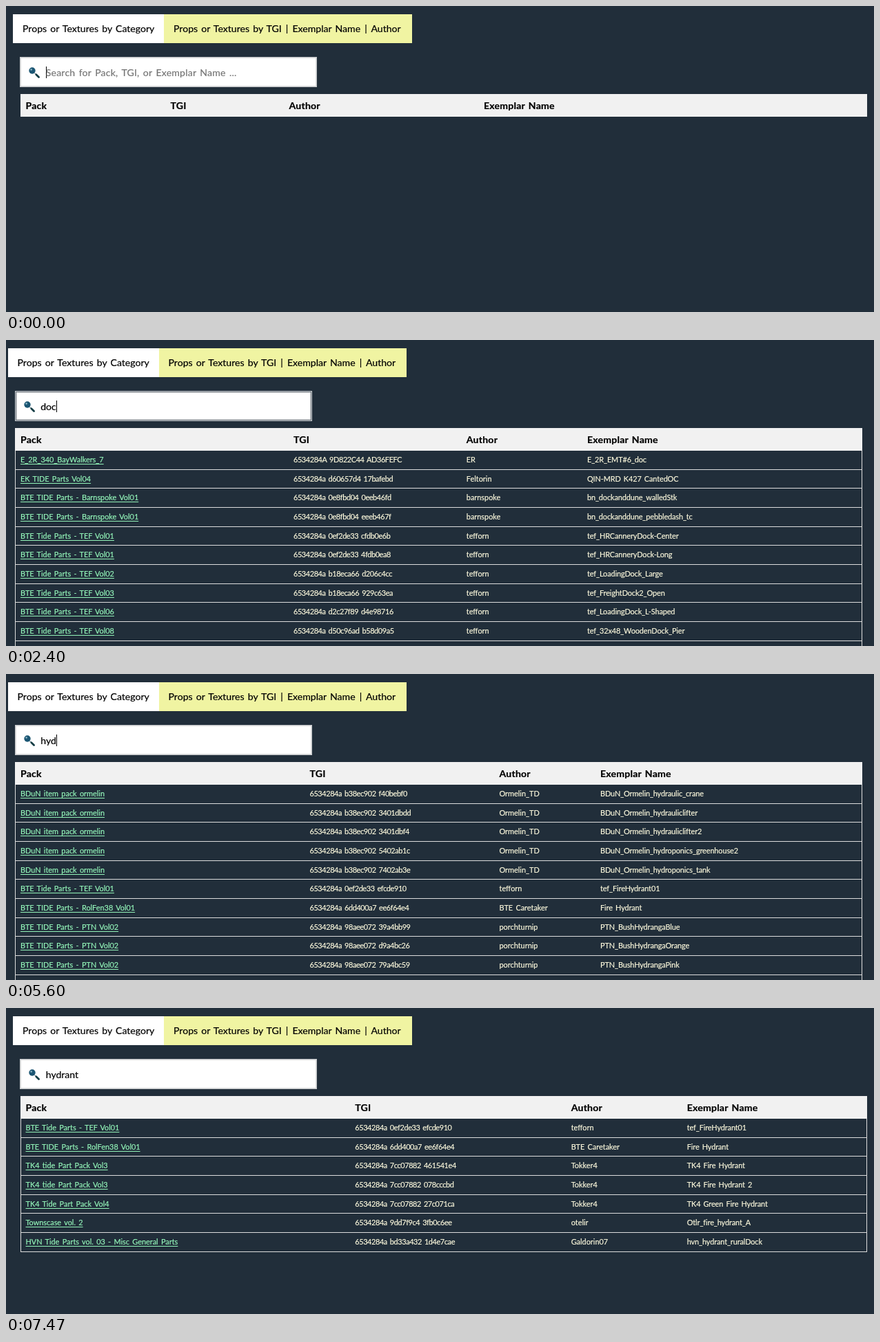
Write an HTML page that moves like this. It is 1259 px wide and 445 px high and loops after 8000 ms.

```html
<!DOCTYPE html>
<html lang="en">
<head>
<meta charset="utf-8">
<title>Prop search</title>
<style>
html, body { margin: 0; width: 100%; height: 100%; overflow: hidden; background: #212e3a; }
body { position: relative; font: 14.1px Lato, sans-serif; word-spacing: .108em; color: #000; white-space: pre;
  -webkit-text-stroke: .2px; }
#page { position: absolute; top: 0; left: 0; width: 1259px; height: 445px; }
#page > *, .row span, .head span { position: absolute; }
.tab { top: 12px; height: 42px; line-height: 42px; padding-left: 14px; box-sizing: border-box; }
#tab1 { left: 10px; width: 219px; background: #fff; }
#tab2 { left: 229px; width: 359.5px; background: #f0f4a2; }
.tab i { font-style: normal; margin: 0 1px; }
#box { left: 20px; top: 74px; width: 431px; height: 44px; box-sizing: border-box; background: #fff;
  border: 1px solid #c9cccf; box-shadow: inset 0 0 0 1px #ddd; }
#box.fresh { box-shadow: inset 0 0 0 1px #68727b, inset 0 0 0 2px #ddd; }
#icon { left: 32px; top: 88px; }
#field { left: 57.7px; top: 88px; height: 17px; line-height: 17px; }
#field span { display: inline-block; height: 17px; vertical-align: top; }
#field .hint { color: #757575; letter-spacing: .2px; }
#field .sel { background: #0078d7; color: #fff; }
#field .caret { width: 1px; margin-right: -1px; background: #000; }
#head, #list { left: 20.5px; width: 1228.5px; box-sizing: border-box; }
.head { top: 128px; height: 33px; line-height: 33px; background: #f1f1f1; font-weight: 700; letter-spacing: .2px; }
#list { top: 161px; overflow: hidden; border: solid #ddd; border-width: 0 1px; font-size: 10.9px; color: #fbf8dc; }
.row { position: relative; height: 27.67px; line-height: 26.67px; box-sizing: border-box; border-bottom: 1px solid #ddd; }
.row span { margin-left: -1px; }
.row .c0 { color: #93f5b9; text-decoration: underline; text-underline-offset: 2px; }
.row .c1 { letter-spacing: -.38px; }
.row .c3 { letter-spacing: -.1px; }
</style>
</head>
<body>
<div id="page">
  <div class="tab" id="tab1">Props or Textures by Category</div>
  <div class="tab" id="tab2">Props or Textures by TGI <i>|</i> Exemplar Name <i>|</i> Author</div>
  <div id="box"></div>
  <svg id="icon" width="18" height="18" viewBox="0 0 18 18">
    <path d="M9.5 9.5 L12 12" stroke="#8a9ba3" stroke-width="1.5"/>
    <path d="M11.8 11.8 L15.6 15.4" stroke="#123c44" stroke-width="2.8" stroke-linecap="round"/>
    <circle cx="6" cy="6" r="4.7" fill="#1b5673"/>
    <circle cx="4.6" cy="4.5" r="1.3" fill="#8fb9c9"/>
  </svg>
  <div id="field"></div>
  <div class="head" id="head"></div>
  <div id="list"></div>
</div>
<script>
const LOOP = 8000, ROW = 27.67, FULL = 10;
const $ = id => document.getElementById(id);
const rows = text => text.trim().split('\n').map(line => line.trim().split('|'));

const docOnly = rows(`
  E_2R_340_BayWalkers_7|6534284A 9D822C44 AD36FEFC|ER|E_2R_EMT#6_doc
  EK TIDE Parts Vol04|6534284a d60657d4 17bafebd|Feltorin|QIN-MRD K427 CantedOC`);

const dock = rows(`
  BTE TIDE Parts - Barnspoke Vol01|6534284a 0e8fbd04 0eeb46fd|barnspoke|bn_dockanddune_walledStk
  BTE TIDE Parts - Barnspoke Vol01|6534284a 0e8fbd04 eeeb467f|barnspoke|bn_dockanddune_pebbledash_tc
  BTE Tide Parts - TEF Vol01|6534284a 0ef2de33 cfdb0e6b|tefforn|tef_HRCanneryDock-Center
  BTE Tide Parts - TEF Vol01|6534284a 0ef2de33 4fdb0ea8|tefforn|tef_HRCanneryDock-Long
  BTE Tide Parts - TEF Vol02|6534284a b18eca66 d206c4cc|tefforn|tef_LoadingDock_Large
  BTE Tide Parts - TEF Vol03|6534284a b18eca66 929c63ea|tefforn|tef_FreightDock2_Open
  BTE Tide Parts - TEF Vol06|6534284a d2c27f89 d4e98716|tefforn|tef_LoadingDock_L-Shaped
  BTE Tide Parts - TEF Vol08|6534284a d50c96ad b58d09a5|tefforn|tef_32x48_WoodenDock_Pier
  BTE Tide Parts - TEF Vol08|6534284a d50c96ad 558f60fa|tefforn|tef_32x80_WoodenDock_Pier_32mOffset
  BTE Tide Parts - TEF Vol08|6534284a d50c96ad d58d0978|tefforn|tef_8x16_WoodenDock_LeftEnd`);

const lifts = rows(`
  BDuN item pack ormelin|6534284a b38ec902 f40bebf0|Ormelin_TD|BDuN_Ormelin_hydraulic_crane
  BDuN item pack ormelin|6534284a b38ec902 3401dbdd|Ormelin_TD|BDuN_Ormelin_hydrauliclifter
  BDuN item pack ormelin|6534284a b38ec902 3401dbf4|Ormelin_TD|BDuN_Ormelin_hydrauliclifter2`);

const farms = rows(`
  BDuN item pack ormelin|6534284a b38ec902 5402ab1c|Ormelin_TD|BDuN_Ormelin_hydroponics_greenhouse2
  BDuN item pack ormelin|6534284a b38ec902 7402ab3e|Ormelin_TD|BDuN_Ormelin_hydroponics_tank`);

const fire = rows(`
  BTE Tide Parts - TEF Vol01|6534284a 0ef2de33 efcde910|tefforn|tef_FireHydrant01
  BTE TIDE Parts - RolFen38 Vol01|6534284a 6dd400a7 ee6f64e4|BTE Caretaker|Fire Hydrant`);

const bushes = rows(`
  39a4bb99|Blue
  d9a4bc26|Orange
  79a4bc59|Pink
  d9a4bc78|PinkBase
  b9a4bca6|Red
  59a4bcc1|RedBase
  99a4bcd8|White
  19a4bcf3|WhiteBase`).map(([id, tint]) =>
  ['BTE TIDE Parts - PTN Vol02', '6534284a 98aee072 ' + id, 'porchturnip', 'PTN_BushHydranga' + tint]);

const others = rows(`
  TK4 tide Part Pack Vol3|6534284a 7cc07882 461541e4|Tokker4|TK4 Fire Hydrant
  TK4 tide Part Pack Vol3|6534284a 7cc07882 078cccbd|Tokker4|TK4 Fire Hydrant 2
  TK4 Tide Part Pack Vol4|6534284a 7cc07882 27c071ca|Tokker4|TK4 Green Fire Hydrant
  Townscase vol. 2|6534284a 9dd7f9c4 3fb0c6ee|otelir|Otlr_fire_hydrant_A
  HVN Tide Parts vol. 03 - Misc General Parts|6534284a bd33a432 1d4e7cae|Galdorin07|hvn_hydrant_ruralDock`);

// Each table: left edges of the last three columns, then its rows.
const tables = {
  none: [[238.5, 410.5, 693], []],
  doc: [[424.5, 675.3, 850.5], [...docOnly, ...dock]],
  dock: [[424.5, 675.3, 850.5], dock],
  hyd: [[448, 723, 869.5], [...lifts, ...farms, ...fire, ...bushes]],
  hydra: [[459.3, 741.5, 893.3], [...lifts, ...fire, ...bushes]],
  hydran: [[470, 760, 915.5], [...fire, ...bushes]],
  hydrant: [[506.3, 819.7, 987.7], [...fire, ...others]]
};

// start ms, typed text, cursor mode, table
const steps = [
  [0, '', 'on', 'none'],
  [1200, '', 'off', 'none'],
  [1270, 'd', 'on', 'none'],
  [1330, 'do', 'on', 'none'],
  [1730, 'doc', 'on', 'none'],
  [2400, 'doc', 'on', 'doc'],
  [2800, 'dock', 'on', 'doc'],
  [3530, 'dock', 'off', 'dock'],
  [3730, 'dock', 'on', 'dock'],
  [4200, 'dock', 'sel', 'dock'],
  [5070, 'hyd', 'on', 'dock'],
  [5600, 'hyd', 'on', 'hyd'],
  [6000, 'hydra', 'on', 'hydra'],
  [7070, 'hydrant', 'on', 'hydran'],
  [7400, 'hydrant', 'on', 'hydrant'],
  [7470, 'hydrant', 'off', 'hydrant']
];

const cells = (texts, edges) => texts.map((text, i) =>
  `<span class="c${i}" style="left:${edges[i] - 20.5}px">${text}</span>`).join('');

function showTable(name) {
  const [cols, data] = tables[name];
  const edges = [28.5, ...cols];
  const long = data.length >= FULL;
  $('head').innerHTML = cells(['Pack', 'TGI', 'Author', 'Exemplar Name'], edges);
  $('list').innerHTML = data.slice(0, FULL).map(r => `<div class="row">${cells(r, edges)}</div>`).join('');
  $('list').style.height = (long ? 284 : data.length * ROW) + 'px';
  // a long list brings a scrollbar, which moves the centred page
  $('page').style.left = long ? '-7.5px' : '0';
}

function showField(text, mode) {
  const caret = mode === 'on' ? '<span class="caret"></span>' : '';
  const hint = '<span class="hint">Search for Pack, TGI, or Exemplar Name ...</span>';
  $('field').innerHTML = text
    ? `<span class="${mode === 'sel' ? 'sel' : ''}">${text}</span>${caret}`
    : caret + hint;
}

let current = -1, table = '';
function draw() {
  const t = performance.now() % LOOP;
  const n = steps.findLastIndex(s => s[0] <= t);
  if (n !== current) {
    const [, text, mode, name] = steps[n];
    if (name !== table) showTable(name);
    showField(text, mode);
    $('box').className = text === 'doc' && name === 'doc' ? 'fresh' : '';
    current = n;
    table = name;
  }
  requestAnimationFrame(draw);
}
draw();
</script>
</body>
</html>
```
